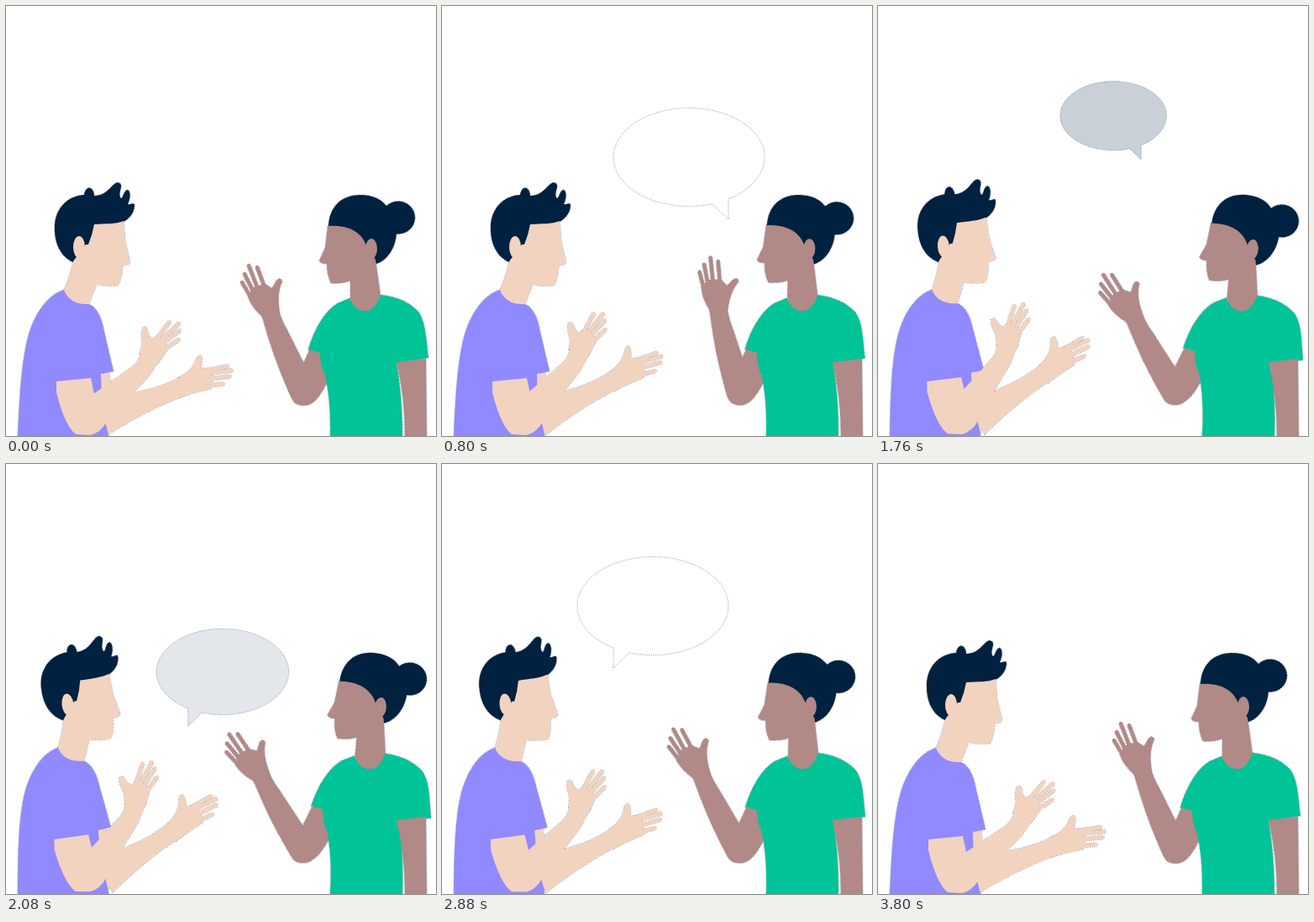
An HTML page with a canvas for the animation above (3.84 s loop, 512 by 512 pixels).

```html
<!DOCTYPE html>
<html lang="en">
<head>
<meta charset="utf-8">
<title>Conversation</title>
<style>
  html, body { margin: 0; width: 100%; height: 100%; overflow: hidden; background: #fff; }
  canvas { display: block; width: 100vw; height: 100vh; }
</style>
</head>
<body>
<canvas id="stage" width="512" height="512"></canvas>
<script>
const ctx = document.getElementById('stage').getContext('2d');
const LOOP = 3840, STEP = 40;
const NAVY = '#00213f', PURPLE = '#9189ff', GREEN = '#00c397', LIGHT = '#f2d3bf', BROWN = '#b18986';

const shape = d => new Path2D(d);

const man = {
  hair: shape('M82 306C66 300 58 284 58 266C57 243 72 226 93 225C94 219 97 215 101 217C104 219 105 223 105 226C118 226 124 216 129 212C134 208 138 212 137 216C136 220 134 226 137 229C140 228 140 219 145 219C149 221 148 230 145 236C149 237 152 233 153 237C153 247 146 254 138 258L110 268L98 290L86 304Z'),
  face: shape('M105 260C118 259 130 260 140 256L142 281L148 305Q146 309 139 308Q137 332 132 333Q118 334 108 331L99 355L96 364L66 352L69 338Q76 322 80 304L95 284L98 284Q103 272 105 260Z'),
  shirt: shape('M69 338C73 350 85 356 98 355C108 358 114 372 116 384L128 435L113 438L122 512L122 530L14 530L14 512C16 470 18 420 28 388C36 364 50 344 69 338Z'),
  backArm: shape('M113 438L123 437L126 462L150 461L122 510L119 496L114 470Z'),
  upperArm: shape('M60 447L101 443L105 462L120 495Q112 509 100 511L83 510Q70 500 60 460Z'),
  frontForearm: shape('M104 462L150 430Q158 424 161 412L184 420L170 441L151 461L118 497Q95 515 85 495Z'),
  frontHand: shape('M159 414Q162 405 162 400Q160 390 163 383Q167 380 169 387Q170 394 174 396L181 393L190 400L191 411L182 424Q168 432 159 414Z'),
  frontFingers: shape('M178 398L195 376M184 398L206 378M187 402L207 386M187 410L206 397'),
  backForearm: shape('M120 470L153 460Q182 455 205 443L217 437L220 461L205 467Q165 483 122 510L118 495Z'),
  backHand: shape('M205 443Q222 434 226 421Q229 414 233 417Q234 424 232 431L242 432L246 442L244 456Q225 460 207 466Z'),
  backFingers: shape('M238 434L264 429M242 437L269 434M242 444L267 441M238 452L259 450')
};

const woman = {
  hair: shape('M384 264C384 243 396 225 422 225C438 225 447 231 452 237C463 245 466 258 465 270C464 288 454 303 441 307L425 296L400 272Z'),
  face: shape('M383 262C400 261 421 264 429 285L440 302L446 345L447 362L430 372L410 362L410 327Q400 331 387 330Q382 320 382 307Q374 307 373 303L380 288Z'),
  shirt: shape('M409 348C414 360 422 364 430 363C438 362 443 352 446 344C466 346 480 353 490 363C500 375 500 395 503 419L465 425Q472 465 472 512L472 530L386 530L386 512Q387 470 380 440Q374 428 374 413L360 409C366 388 378 364 395 354Z'),
  farArm: shape('M465 424L500 420L501 512L475 512Q475 465 465 424Z'),
  upperArm: shape('M362 408L378 410L384 445Q372 470 362 474Q352 478 343 472L352 430Z'),
  forearm: shape('M305 370L309 360L324 360Q328 374 335 386L356 428Q372 445 368 465Q364 475 355 475Q344 475 340 467Q330 445 320 418Q312 395 305 370Z'),
  hand: shape('M305 370Q292 358 288 346L295 335L308 331L317 336L322 327Q327 322 329 328Q323 340 325 358L326 368Q315 378 305 370Z'),
  fingers: shape('M291 346L281 329M295 341L284 319M300 337L289 309M308 335L299 311')
};

let outlining = false;

const clamp = v => Math.min(1, Math.max(0, v));
const ease = (t, from, to) => {
  const u = clamp((t - from) / (to - from));
  return u * u * (3 - 2 * u);
};

function dottedStroke(path, width) {
  ctx.save();
  ctx.globalAlpha = 0.5;
  ctx.strokeStyle = NAVY;
  ctx.lineWidth = width;
  ctx.setLineDash([1, 1.6]);
  ctx.stroke(path);
  ctx.restore();
}

function fill(path, color) {
  if (outlining) return dottedStroke(path, 1.5);
  ctx.fillStyle = color;
  ctx.fill(path);
}

function oval(x, y, rx, ry, color) {
  const path = new Path2D();
  path.ellipse(x, y, rx, ry, 0, 0, 2 * Math.PI);
  fill(path, color);
}

function fingers(path, color) {
  const width = 4.4;
  if (outlining) return dottedStroke(path, width + 1.5);
  ctx.strokeStyle = color;
  ctx.lineWidth = width;
  ctx.lineCap = 'round';
  ctx.stroke(path);
  ctx.lineCap = 'butt';
}

function turned(x, y, degrees, draw) {
  ctx.save();
  ctx.translate(x, y);
  ctx.rotate(degrees * Math.PI / 180);
  ctx.translate(-x, -y);
  draw();
  ctx.restore();
}

// Dotted edges go underneath, so that only the outer silhouette shows them.
function figure(draw, t) {
  for (outlining of [true, false]) draw(t);
}

function drawMan(t) {
  const lean = ease(t, 960, 2400) - ease(t, 2480, 3680);
  const swing = t < 1920 ? -13.6 * t / 1920 : -13.6 + 15.1 * (t - 1920) / 1920;
  const bend = 0.55 * swing;
  turned(60, 512, -2.7 * lean, () => {
    turned(88, 345, -4.8 * lean, () => {
      fill(man.hair, NAVY);
      fill(man.face, LIGHT);
      oval(87, 287, 7, 13, LIGHT);
    });
    fill(man.shirt, PURPLE);
    fill(man.backArm, LIGHT);
  });
  turned(125, 487, swing, () => {
    fill(man.backForearm, LIGHT);
    turned(212, 451, bend, () => {
      fill(man.backHand, LIGHT);
      fingers(man.backFingers, LIGHT);
    });
  });
  turned(60, 512, -2.7 * lean, () => fill(man.upperArm, LIGHT));
  turned(98, 492, swing, () => {
    fill(man.frontForearm, LIGHT);
    turned(172, 414, bend, () => {
      fill(man.frontHand, LIGHT);
      fingers(man.frontFingers, LIGHT);
    });
  });
}

function drawWoman(t) {
  const lean = ease(t, 320, 1920) - ease(t, 1920, 3520);
  const swing = 8.2 * ease(t, 0, 800) - 15 * ease(t, 900, 1900) + 6.8 * ease(t, 2200, 3700);
  turned(430, 512, 2 * lean, () => fill(woman.upperArm, BROWN));
  turned(355, 463, swing, () => {
    fill(woman.forearm, BROWN);
    turned(315, 367, 0.9 * swing, () => {
      fill(woman.hand, BROWN);
      fingers(woman.fingers, BROWN);
    });
  });
  turned(430, 512, 2 * lean, () => {
    turned(427, 350, 3.2 * lean, () => {
      oval(467, 252, 20, 19.5, NAVY);
      fill(woman.hair, NAVY);
      fill(woman.face, BROWN);
      oval(435, 289, 7, 12, BROWN);
    });
    fill(woman.shirt, GREEN);
  });
  fill(woman.farArm, BROWN);
}

// Pops in over 480 ms, drifts upwards, then shrinks towards the pivot.
function drawBubble(age, x, y, driftX, driftY, side) {
  if (age <= 0 || age >= 1920) return;
  const grow = 1 - (1 - clamp(age / 480)) ** 3;
  const size = grow - clamp((age - 1440) / 480) ** 3;
  if (size < 0.03) return;
  const pivotX = 257, pivotY = 180;
  const scaled = new DOMMatrix()
    .translate(pivotX + size * (x + driftX * age - pivotX), pivotY + size * (y + driftY * age - pivotY))
    .scale(size * side, size);
  const outline = new Path2D();
  outline.ellipse(0, 0, 90, 58.5, 0, 1.257, 1.023 + 2 * Math.PI);
  outline.lineTo(47, 74);
  outline.closePath();
  const bubble = new Path2D();
  bubble.addPath(outline, scaled);
  fill(bubble, '#fff');
  ctx.globalAlpha = size * (1 - size);
  fill(bubble, NAVY);
  ctx.globalAlpha = 1;
  dottedStroke(bubble, 1);
}

function draw(t) {
  ctx.fillStyle = '#fff';
  ctx.fillRect(0, 0, 512, 512);
  figure(drawMan, t);
  figure(drawWoman, t);
  drawBubble(t, 297.4, 238.3, -0.0042, -0.0729, 1);
  drawBubble(t - 1840, 260.1, 283.4, -0.00875, -0.11, -1);
}

const start = performance.now();
function tick() {
  const t = (performance.now() - start) % LOOP;
  draw(Math.floor(t / STEP) * STEP);
  requestAnimationFrame(tick);
}
tick();
</script>
</body>
</html>
```
